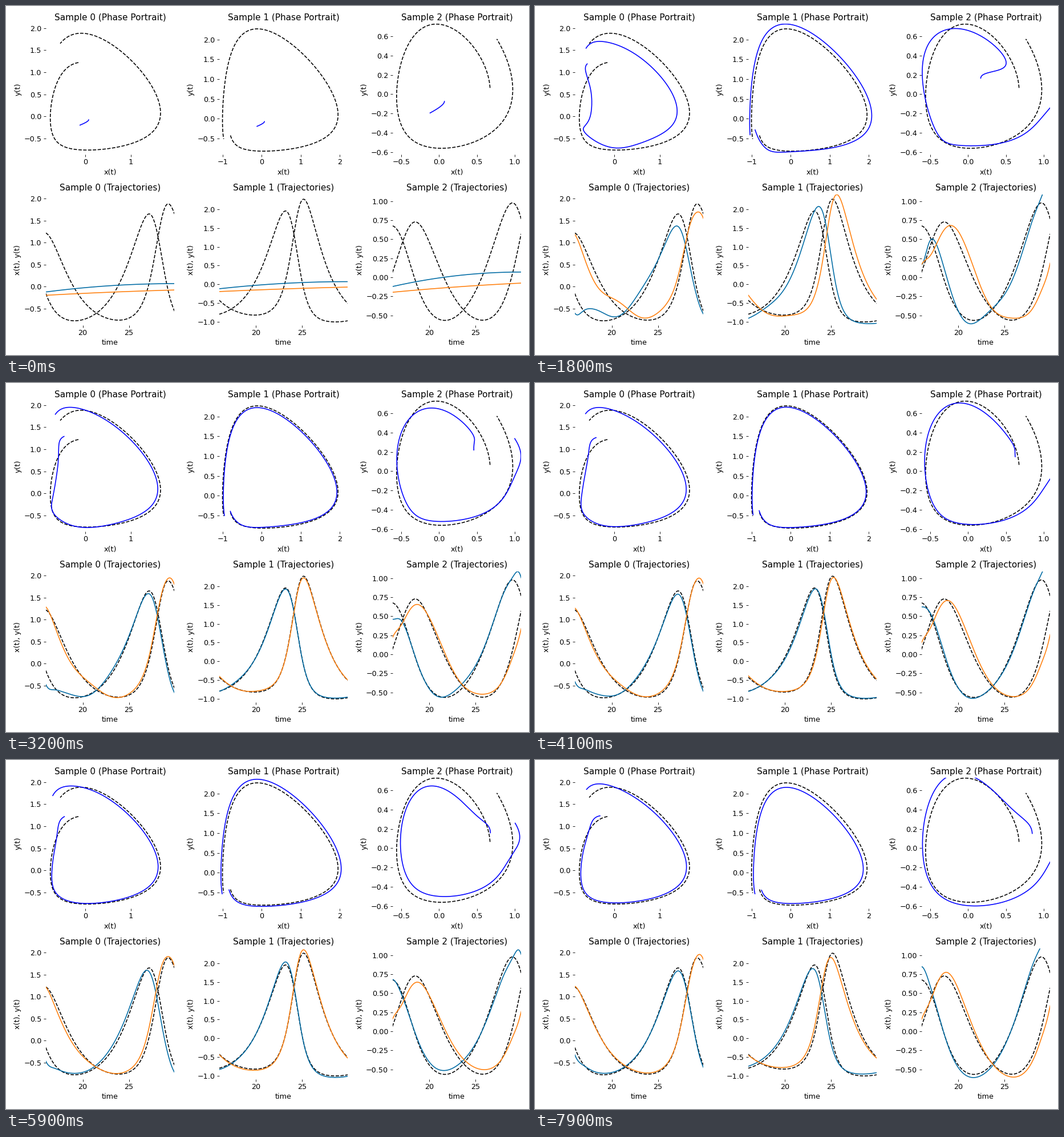
These frames come from a looping animation (917x611 px, 8000 ms). A matplotlib script:

```python
import numpy as np
import matplotlib.pyplot as plt
from matplotlib.animation import FuncAnimation

W, H, DPI = 917, 611, 76.4
FRAMES, INTERVAL = 80, 100
T0, T1, POINTS = 16.0, 29.93, 240
DT, DELAY, LEAD = 0.01, 10, 70
BLUE, ORANGE = "#006BA4", "#FF800E"

plt.rcParams.update({"font.family": "DejaVu Sans", "font.size": 12})

# Equilibrium sits at the origin; SCALE is its distance to extinction
SCALE = np.array([[1.18], [1.125]])
INITIAL = np.array([[-0.155, -0.80, 0.675],
                    [1.22, -0.425, 0.065]])


def simulate():
    """Predator-prey system whose species react to each other with a delay."""
    def growth(p):
        return 0.5 * np.stack([1 - p[1], p[0] - 1])

    first = 1 + INITIAL / SCALE
    path = [first * np.exp(growth(first) * DT * k) for k in range(-LEAD, 1)]
    for _ in range(int((T1 - T0) / DT) + LEAD):
        delayed = (path[-DELAY - 1] + path[-DELAY]) / 2
        path.append(path[-1] * np.exp(growth(delayed) * DT))
    path = SCALE * (np.array(path) - 1)
    return T0 + DT * (np.arange(len(path)) - LEAD), path


sim_time, sim_path = simulate()
time = np.linspace(T0, T1, POINTS)
u = np.linspace(0, 1, POINTS)


def truth(n, x_lag=0, y_lag=0):
    return np.array([np.interp(time - lag, sim_time, sim_path[:, k, n])
                     for k, lag in enumerate((x_lag, y_lag))])


# How the fit wanders around the truth while training goes on, per sample
WARMUP = 18
STEPS = [WARMUP, 32, 50, 59, 72, 79]
LAG = [(-0.2, -0.1, 0, -0.25, 0, 0),
       (0.45, 0, 0.2, 0, -0.25, -0.2),
       (0.2, -0.1, 0.25, 0, -0.05, 0)]
GAIN = [(0.85, 0.97, 0.95, 0.97, 1, 0.96),
        (1.05, 0.98, 0.99, 1.04, 0.94, 0.95),
        (1, 0.95, 1.05, 0.9, 1.08, 1.07)]
Y_LAG = (0, 0, 0.2)
WOBBLE = (0.15, 0.05, 0.1)

# Lasting x, y errors at both ends of the window, and an early one in x
LEFT = [(-0.16, 0.06), (0, 0), (0.16, 0.15)]
RIGHT = [(-0.08, 0.25), (0, 0), (0.32, -0.15)]
EARLY = (-0.1, 0, -0.6)

left_edge = np.exp(-((time - T0) / 0.8) ** 2)
right_edge = np.exp(-((T1 - time) / 0.8) ** 2)
ripple = (1 - u) * np.sin(2 * np.pi * (time - 16.8) / 5.5)
untrained = np.array([-0.12 + 0.19 * u * (2 - u), -0.195 + 0.16 * u - 0.04 * u**2])


def prediction(n, frame):
    fade = np.exp(-max(frame - WARMUP, 0) / 20)
    lag = np.interp(frame, STEPS, LAG[n])
    fit = np.interp(frame, STEPS, GAIN[n]) * truth(n, lag, lag + Y_LAG[n])
    fit += np.outer(LEFT[n], left_edge) + np.outer(RIGHT[n], right_edge)
    fit += WOBBLE[n] * fade * np.outer((1, -1), ripple)
    fit[0] += EARLY[n] * fade * left_edge
    learned = min(frame / WARMUP, 1)
    return (1 - learned) * untrained + learned * fit


fig = plt.figure(figsize=((W + 0.001) / DPI, (H + 0.001) / DPI), dpi=DPI, facecolor="white")


def panel(n, top, name, xlabel, ylabel, xlim, ylim, xstep, ystep):
    left, width, height = 69.8 + 303.9 * n, 225.65, 228.9
    ax = fig.add_axes([left / W, 1 - (top + height) / H, width / W, height / H])
    ax.set(title=f"Sample {n} ({name})", xlabel=xlabel, ylabel=ylabel,
           xlim=xlim, ylim=ylim)
    ax.xaxis.set_major_locator(plt.MultipleLocator(xstep))
    ax.yaxis.set_major_locator(plt.MultipleLocator(ystep))
    ax.spines[:].set_visible(False)
    return ax


# Per sample: x and y limits, tick steps of the phase plot and the trajectories
LAYOUT = [
    ((-0.873, 1.960), (-0.860, 2.097), 1, 0.5, 0.5),
    ((-1.091, 2.208), (-0.908, 2.400), 1, 0.5, 0.5),
    ((-0.619, 1.088), (-0.626, 0.730), 0.5, 0.2, 0.25),
]

lines = []
for n, (xlim, ylim, xstep, ystep, tstep) in enumerate(LAYOUT):
    x, y = truth(n)
    both = min(xlim[0], ylim[0]), max(xlim[1], ylim[1])
    phase = panel(n, 31.1, "Phase Portrait", "x(t)", "y(t)", xlim, ylim, xstep, ystep)
    traj = panel(n, 329.8, "Trajectories", "time", "x(t), y(t)", (T0, T1), both, 5, tstep)
    phase.plot(x, y, "k--")
    traj.plot(time, x, "k--", time, y, "k--")
    lines.append((phase.plot([], [], "b-")[0],
                  traj.plot([], [], color=BLUE)[0],
                  traj.plot([], [], color=ORANGE)[0]))


def update(frame):
    for n, (orbit, x_line, y_line) in enumerate(lines):
        x, y = prediction(n, frame)
        orbit.set_data(x, y)
        x_line.set_data(time, x)
        y_line.set_data(time, y)
    return [line for group in lines for line in group]


anim = FuncAnimation(fig, update, frames=FRAMES, interval=INTERVAL,
                     repeat=True, repeat_delay=0, blit=False)
plt.show()
```
